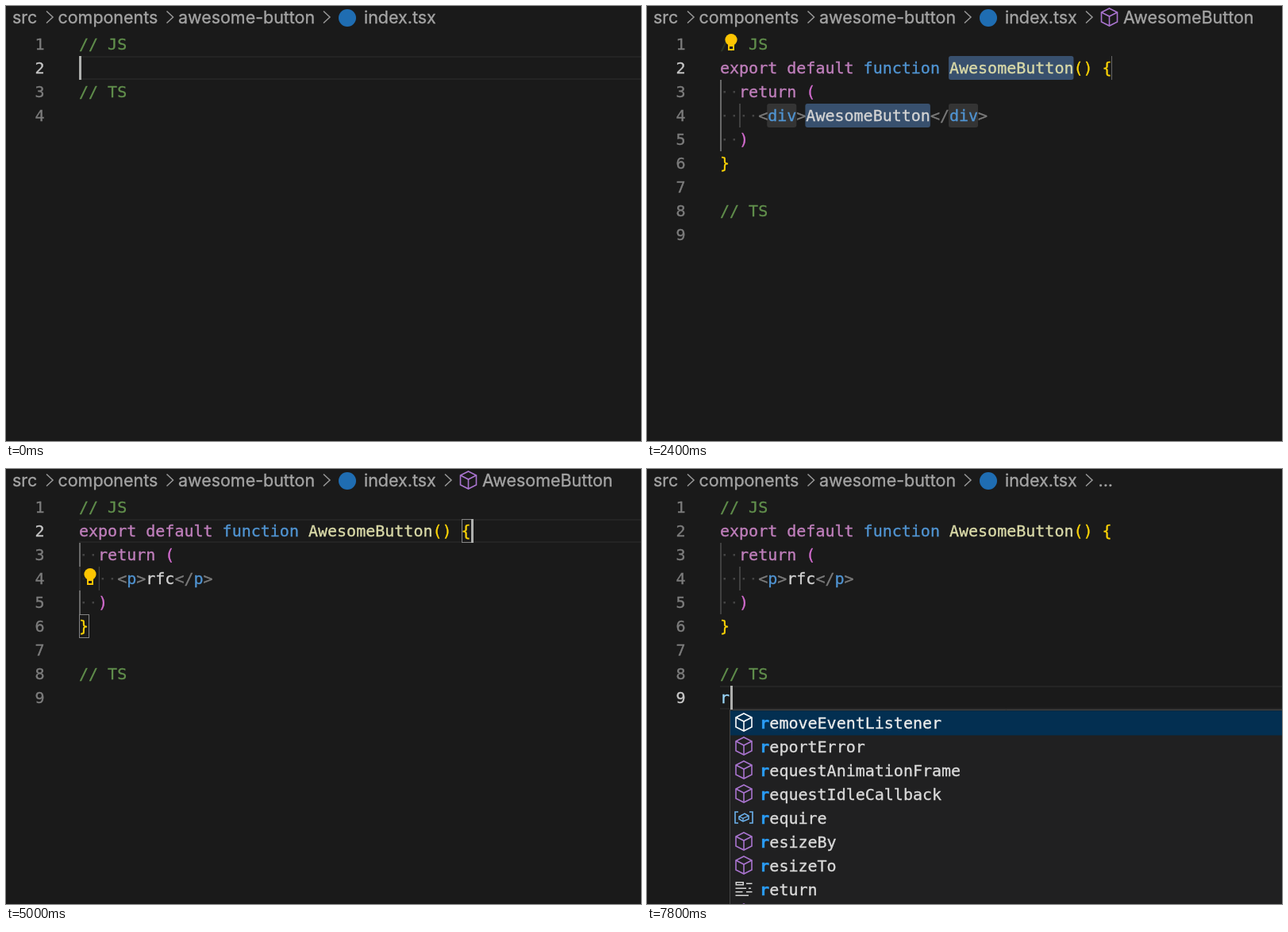
An HTML page with a canvas for the animation above (8000 ms loop, 800 px wide and 548 px high).

```html
<!DOCTYPE html>
<html lang="en">
<head>
<meta charset="utf-8">
<title>Snippet demo</title>
<style>
  html, body { margin: 0; width: 100%; height: 100%; overflow: hidden; background: #1a1a1a; }
  canvas { display: block; }
</style>
</head>
<body>
<canvas id="stage" width="800" height="548"></canvas>
<script>
const ctx = document.getElementById('stage').getContext('2d');
const W = 800, H = 548, LOOP = 8000, STEP = 200;
const LEFT = 92, CHAR = 12.04, LINE = 30, TOP = 33;
const MONO = '"DejaVu Sans Mono", monospace';
const C = {
  bg: '#1a1a1a', comment: '#618f4c', keyword: '#c07fbc', blue: '#5094d2', name: '#dadaa8',
  gold: '#fdd506', pink: '#d36ccf', grey: '#7b7b7b', text: '#d4d4d4', ident: '#9ad6f8',
  match: '#2a9cf6', crumb: '#a4a4a4', cube: '#a974cf', select: '#38506e', mirror: '#44474a',
  stop: '#343434', guide: '#404040', guideOn: '#686868', caret: '#aeafad', rowOn: '#032f51'
};
const NAME = 'AwesomeButton';
// Brackets mark the matched letters.
const SNIPPETS = [
  ['[rFC].$rFC', 'reactFnC'],
  ['[rFC].TS.$$rFC.(interface)', 'TS ReactFnCom'],
  ['[rFC].TS.$$rFC.(type)', 'TS ReactFnC'],
  ['[rFC]e.$rFCe', 'reactFnCompExp'],
  ['[rFC]e.TS.$$rFCe.(interface)', 'TS ReactFnCompExpor'],
  ['[rFC]e.TS.$$rFCe.(type)', 'TS ReactFnCompExp'],
  ['[rFC]ne.$rFCne', 'reactFnCompNoExp'],
  ['[rFC]p.$rFCp', 'reactFnCompPropTy'],
  ['[rFC]pch.$rFCpch', 'reactFnCompPropTypesChl'],
  ['[r]n[FC]e.$rnFCe', 'reactNativeFnCompExp'],
  ['[r]nFC.$rn[FC]', 'reactNativeFnC'],
  ['[r]A[FC].TS.$$rAFC.(interface)', 'TS ReactArrowFnCom']
].map(([label, detail]) => ({ label, detail, icon: snippetIcon }));
const GLOBALS = [
  '[r]emoveEventListener', '[r]eportError', '[r]equestAnimationFrame', '[r]equestIdleCallback',
  '[r]equire', '[r]esizeBy', '[r]esizeTo', '[r]eturn'
].map((label, i) => ({ label, icon: i === 4 ? variableIcon : i === 7 ? keywordIcon : cubeIcon }));

const colX = col => LEFT + col * CHAR;
const lineY = n => TOP + (n - 1) * LINE;

function rect(x, y, w, h, color) {
  ctx.fillStyle = color;
  ctx.fillRect(x, y, w, h);
}

// A hairline outline gives the text its slightly heavier weight.
function write(s, x, y, color, font) {
  ctx.font = font;
  ctx.fillStyle = ctx.strokeStyle = color;
  ctx.lineWidth = .35;
  ctx.fillText(s, x, y);
  ctx.strokeText(s, x, y);
}

function path(points, color, width, close) {
  ctx.beginPath();
  points.forEach(([x, y]) => ctx.lineTo(x, y));
  if (close) ctx.closePath();
  ctx.strokeStyle = color;
  ctx.lineWidth = width;
  ctx.stroke();
}

function tokens(n, col, ...parts) {
  for (let i = 0; i < parts.length; i += 2) {
    write(parts[i], colX(col), lineY(n) + 22, parts[i + 1], `20px ${MONO}`);
    col += parts[i].length;
  }
}

function mark(n, col, len, color) {
  ctx.fillStyle = color;
  ctx.beginPath();
  ctx.roundRect(colX(col) - 1, lineY(n), len * CHAR + 1, LINE, 3);
  ctx.fill();
}

function bracketBox(n, col) {
  ctx.strokeStyle = '#858585';
  ctx.lineWidth = 1;
  ctx.strokeRect(Math.round(colX(col)) + .5, lineY(n) + .5, 12, LINE - 1);
}

function cubeIcon(cx, cy, color = C.cube) {
  const hex = [[0, -11], [10, -6], [10, 6], [0, 11], [-10, 6], [-10, -6]];
  const at = ([x, y]) => [cx + x, cy + y];
  path(hex.map(at), color, 1.6, true);
  path([[-10, -6], [0, -1], [10, -6]].map(at), color, 1.6);
  path([[0, -1], [0, 11]].map(at), color, 1.6);
}

function snippetIcon(cx, cy) {
  const x = cx - 10, y = cy - 11;
  path([[x, y + 19], [x, y], [x + 20.5, y], [x + 20.5, y + 19]], C.text, 1.5);
  for (let i = 0; i < 6; i++) rect(x - 1 + i * 4, y + 20.5, 2, 1.6, C.text);
}

function variableIcon(cx, cy) {
  const color = '#6cb2ee';
  for (const d of [-1, 1]) {
    path([[cx + d * 7, cy - 7], [cx + d * 11, cy - 7], [cx + d * 11, cy + 7], [cx + d * 7, cy + 7]], color, 1.6);
  }
  path([[cx - 6, cy - 1], [cx + 1, cy - 5], [cx + 6, cy - 2], [cx + 6, cy + 2], [cx - 1, cy + 5], [cx - 6, cy + 2]], color, 1.5, true);
  path([[cx - 6, cy - 1], [cx - 1, cy + 1], [cx + 6, cy - 2]], color, 1.3);
  path([[cx - 1, cy + 1], [cx - 1, cy + 5]], color, 1.3);
}

function keywordIcon(cx, cy) {
  const u = 1.5, x = cx - 12, y = cy - 12;
  const bars = [[10, 3, 5], [1, 7, 9], [12, 7, 2], [1, 10, 6], [10, 10, 5], [1, 13, 11]];
  bars.forEach(([bx, by, w]) => rect(x + bx * u, y + by * u, w * u, u, C.text));
  ctx.strokeStyle = C.text;
  ctx.lineWidth = u;
  ctx.strokeRect(x + 1.5 * u, y + 2.5 * u, 6 * u, 2 * u);
}

function emojiSquare(x, y, blue) {
  const g = ctx.createLinearGradient(0, y, 0, y + 21);
  const stops = blue ? ['#0d49b4', '#1350c6', '#0c3c9c'] : ['#b98a10', '#c0920f', '#9c7008'];
  stops.forEach((color, i) => g.addColorStop([0, .45, 1][i], color));
  rect(x, y, 21, 21, g);
}

function menu(left, top, items, selected) {
  const h = 367;
  ctx.save();
  ctx.beginPath();
  ctx.rect(left, top, W - left, h);
  ctx.clip();
  rect(left, top, W - left, h, '#202021');
  rect(left + 1, top + 1.5 + selected * LINE, W, LINE + 1, C.rowOn);
  items.forEach((item, i) => {
    const y = top + 2 + i * LINE, on = i === selected;
    item.icon(left + 18, y + 14, on && item.icon === cubeIcon ? '#fff' : undefined);
    let x = left + 38.3;
    item.label.split(/[\[\]]/).forEach((part, k) => {
      const hit = k % 2 === 1;
      write(part, x, y + 22, hit ? C.match : on ? '#ececec' : '#dadada', `${hit ? 'bold ' : ''}20px ${MONO}`);
      x += part.length * CHAR;
    });
    if (!item.detail) return;
    const dx = W - item.detail.length * 10.234;
    emojiSquare(dx - 31, y + 4.5, item.detail.startsWith('TS'));
    write(item.detail, dx - .3, y + 21, on ? '#c4c4c4' : '#9c9c9c', `17px ${MONO}`);
  });
  const next = items.length < 12 ? cubeIcon : snippetIcon;
  next(left + 18, top + 2 + items.length * LINE + 14);
  path([[W, top + .5], [left + .5, top + .5], [left + .5, top + h - .5], [W, top + h - .5]], '#454545', 1);
  ctx.restore();
}

function bulb(n) {
  const y = lineY(n);
  rect(LEFT, y, 25, LINE, 'rgba(26,26,26,.78)');
  ctx.fillStyle = '#fdc502';
  ctx.beginPath();
  ctx.arc(106, y + 9.5, 7.6, 0, 7);
  ctx.fill();
  rect(102, y + 14, 8, 9, '#fdc502');
  rect(104, y + 18, 4, 3, C.bg);
}

function breadcrumb(tail) {
  const put = (s, x) => write(s, x, 22, C.crumb, '21.45px Inter, sans-serif');
  const chevron = x => path([[x, 6.5], [x + 8, 14], [x, 21.5]], '#999', 1.5);
  put('src', 8);
  put('components', 65.5);
  put('awesome-button', 217);
  put('index.tsx', 451);
  [51, 202.5, 400].forEach(chevron);
  ctx.fillStyle = '#1f6db2';
  ctx.beginPath();
  ctx.arc(430, 15, 11, 0, 7);
  ctx.fill();
  if (!tail) return;
  chevron(553);
  if (tail === '...') return put(tail, 568.5);
  cubeIcon(582.5, 14);
  put(tail, 600);
}

function lineNumbers(count, active) {
  for (let n = 1; n <= count; n++) {
    write(n, 36.5, lineY(n) + 22, n === active ? '#c6c6c6' : '#7c7c7c', `20px ${MONO}`);
  }
}

function currentLine(n) {
  rect(LEFT, lineY(n), W, 2, '#242424');
  rect(LEFT, lineY(n) + 28, W, 2, '#242424');
}

function caret(n, col) {
  rect(Math.ceil(colX(col)), lineY(n), 3, LINE, C.caret);
}

// Latest entry of a [time, value] list that has begun.
const latest = (t, list) => list.reduce((v, [at, x]) => t >= at ? x : v, undefined);
const ACTIONS = [0, 200, 400, 600, 1000, 1200, 1400, 1800, 2800, 3200, 3600, 4200, 4400, 4600, 5000, 6000, 6400, 6600, 6800, 7800];

function blinkOn(t) {
  const last = latest(t, ACTIONS.map(a => [a, a]));
  return (t - last) % 1000 < 500;
}

function typingScene(t) {
  const typed = 'rfc'.slice(0, Math.min(3, t / STEP));
  breadcrumb('');
  currentLine(2);
  lineNumbers(4, 2);
  tokens(1, 0, '// JS', C.comment);
  tokens(2, 0, typed, C.ident);
  tokens(3, 0, '// TS', C.comment);
  const left = Math.ceil(colX(typed.length));
  if (typed.length === 1) menu(left, 93, [...GLOBALS, ...SNIPPETS.slice(0, 4)], 0);
  else if (typed) menu(left, 93, SNIPPETS, Math.max(0, Math.min(3, t / STEP - 4)));
  if (blinkOn(t)) caret(2, typed.length);
}

function codeScene(t) {
  const tag = t < 3200 ? 'div' : 'p';
  const body = latest(t, [[0, NAME], [4200, 'r'], [4400, 'rf'], [4600, 'rfc']]);
  const active = latest(t, [[0, 2], [2800, 4], [5000, 2], [6000, 3], [6400, 5], [6600, 7], [6800, 9]]);
  const stage = latest(t, [[0, 'name'], [2800, 'tag'], [3600, 'body'], [5000, 'done']]);
  const open = 5, bodyCol = open + tag.length + 1, close = bodyCol + body.length + 2;
  const typedR = t >= 7800;
  const selecting = stage === 'name' || (stage === 'tag' && t < 3200) || (stage === 'body' && t < 4200);

  breadcrumb(latest(t, [[0, ''], [2000, NAME], [7000, '...']]));
  if (!selecting) currentLine(active);
  lineNumbers(9, active);

  if (stage !== 'done') {
    const tagColor = stage === 'tag' && selecting ? C.select : C.stop;
    mark(4, open, tag.length, tagColor);
    mark(4, close, tag.length, tagColor);
    rect(585, lineY(2), 1, LINE, '#666');
    if (stage === 'name') mark(2, 24, 13, C.select);
    if (stage === 'body' && selecting) mark(2, 24, 13, C.mirror);
    mark(4, bodyCol, body.length, stage !== 'tag' && selecting ? C.select : C.stop);
  }

  const outer = active === 2 || active === 6;
  const inner = active >= 3 && active <= 5;
  rect(LEFT, lineY(3), 2, 90, outer ? C.guideOn : C.guide);
  rect(116, lineY(4), 2, LINE, inner ? C.guideOn : C.guide);
  [[3, 2], [4, 4], [5, 2]].forEach(([n, count]) => {
    for (let c = 0; c < count; c++) rect(colX(c) + 4.5, lineY(n) + 14, 2.5, 2.5, '#444');
  });

  tokens(1, 0, '// JS', C.comment);
  tokens(2, 0, 'export default ', C.keyword, 'function ', C.blue, NAME, C.name, '() {', C.gold);
  tokens(3, 2, 'return ', C.keyword, '(', C.pink);
  tokens(4, 4, '<', C.grey, tag, C.blue, '>', C.grey, body, C.text, '</', C.grey, tag, C.blue, '>', C.grey);
  tokens(5, 2, ')', C.pink);
  tokens(6, 0, '}', C.gold);
  tokens(8, 0, '// TS', C.comment);
  if (typedR) tokens(9, 0, 'r', C.ident);

  const bulbLine = latest(t, [[0, 0], [2200, 1], [2800, 0], [3200, 4], [5200, 1], [6200, 2], [6400, 0]]);
  if (bulbLine) bulb(bulbLine);

  if (stage === 'done') {
    if (active === 2) { bracketBox(2, 40); bracketBox(6, 0); }
    if (active === 3 || active === 5) { bracketBox(3, 9); bracketBox(5, 2); }
  }
  if (blinkOn(t)) {
    if (stage === 'name') {
      caret(2, 37);
      caret(4, bodyCol + body.length);
    } else if (stage === 'tag') {
      caret(4, open + tag.length);
      caret(4, close + tag.length);
    } else if (stage === 'body') {
      caret(4, bodyCol + body.length);
    } else {
      caret(active, { 2: 41, 3: 10, 5: 3, 9: typedR ? 1 : 0 }[active] || 0);
    }
  }
  if (typedR) menu(104, 303, GLOBALS, 0);
}

function frame(now) {
  const t = Math.floor(now % LOOP / STEP) * STEP;
  rect(0, 0, W, H, C.bg);
  (t < 1800 ? typingScene : codeScene)(t);
  requestAnimationFrame(frame);
}
requestAnimationFrame(frame);
</script>
</body>
</html>
```
